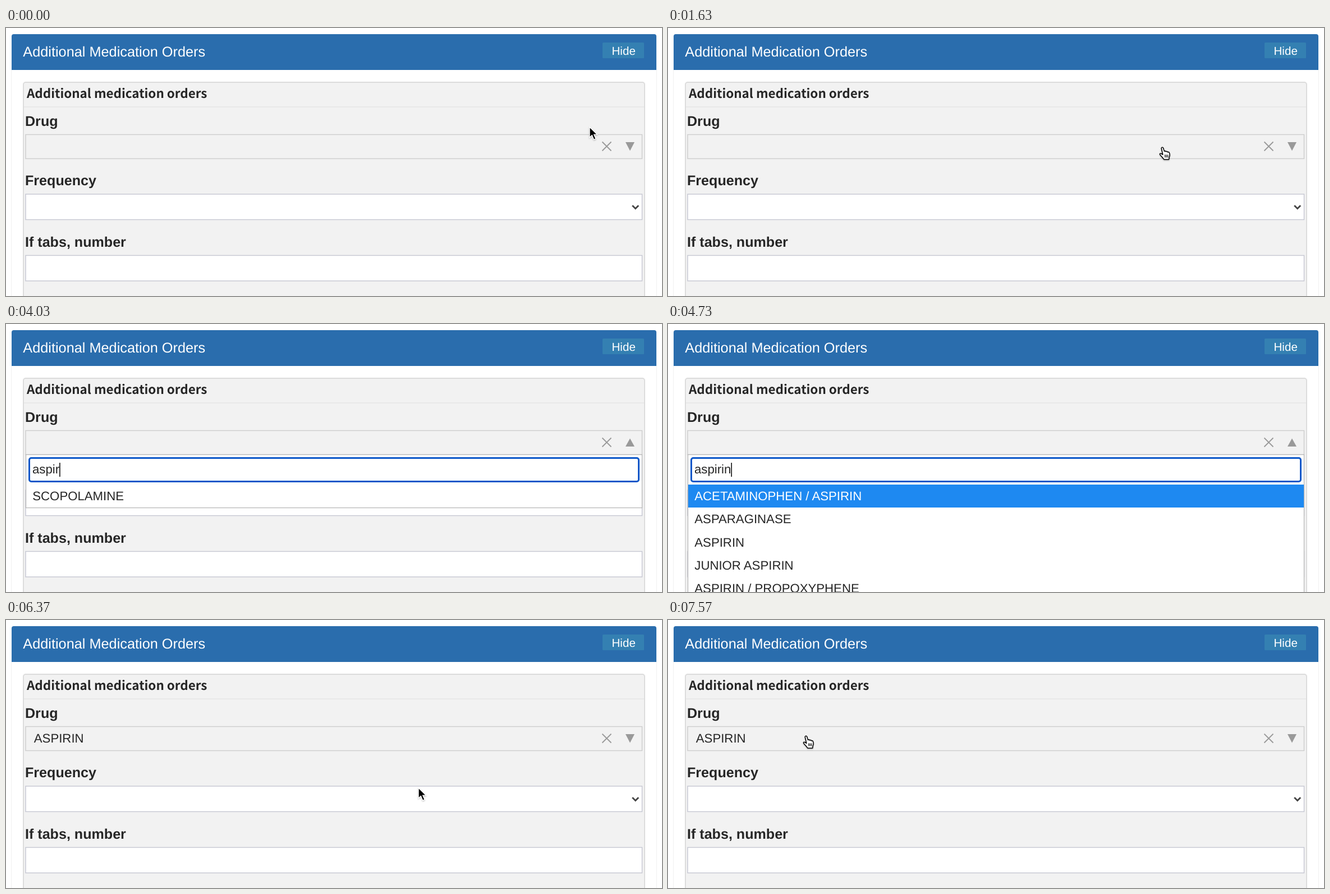
An HTML page for the animation above (8000 ms loop, 1169 by 479 pixels).

```html
<!DOCTYPE html>
<html lang="en">
<head>
<meta charset="utf-8">
<title>Medication order form</title>
<style>
  html, body { margin: 0; width: 100%; height: 100%; overflow: hidden; background: #fff; }
  svg { display: block; width: 1169px; height: 479px; }
  text { font: 22.2px "Liberation Sans", Arial, sans-serif; fill: #262626; text-rendering: geometricPrecision; white-space: pre; }
  .title { font-size: 25.3px; fill: #fff; }
  .hide { font-size: 20.6px; fill: #fff; }
  .legend { font: bold 22.4px "Noto Sans CJK JP", "Noto Sans CJK SC", "Noto Sans CJK", "Noto Sans", sans-serif; }
  .label { font-size: 25.1px; font-weight: bold; }
  .field { fill: #fff; stroke: #c5c7d2; stroke-width: 1.4; }
  .picked { fill: #fff; }
</style>
</head>
<body>
<svg viewBox="0 0 1169 479">
  <defs>
    <filter id="soft" x="-50%" y="-50%" width="200%" height="200%">
      <feDropShadow dx="0" dy="1.2" stdDeviation="1" flood-opacity=".3"/>
    </filter>
  </defs>

  <path d="M9.5 75V490M1159.5 75V490" stroke="#f0f0f0"/>
  <path d="M10 75V15Q10 11 14 11H1155Q1159 11 1159 15V75Z" fill="#2a6dad"/>
  <text class="title" x="30.3" y="51.3">Additional Medication Orders</text>
  <rect x="1063" y="26" width="74" height="28" rx="1.5" fill="#3480b2"/>
  <text class="hide" x="1079.5" y="47.8">Hide</text>

  <rect x="31" y="97" width="1107" height="400" rx="4" fill="#f2f2f2" stroke="#dcdcdc" stroke-width="2"/>
  <path d="M32 141H1137" stroke="#e6e6e6" stroke-width="1.5"/>
  <text class="legend" x="37" y="125">Additional medication orders</text>

  <text class="label" x="34" y="174.8">Drug</text>
  <rect x="35" y="190.5" width="1098.5" height="43" fill="#f2f2f2" stroke="#cdcdcd" stroke-width="1.4"/>
  <text id="value" x="49.8" y="219">ASPIRIN</text>
  <path d="M1062.5 203.5L1078.5 219.5M1078.5 203.5L1062.5 219.5" stroke="#999" stroke-width="1.8"/>
  <path id="toggle" fill="#999"/>

  <text class="label" x="34" y="281.3">Frequency</text>
  <rect class="field" x="35" y="297" width="1098.5" height="45.5"/>
  <path d="M1116.2 317.3L1121.7 322.8L1127.2 317.3" fill="none" stroke="#444" stroke-width="2.8"/>
  <text class="label" x="34" y="390.6">If tabs, number</text>
  <rect class="field" x="35" y="406.5" width="1098.5" height="45.5"/>

  <g id="drop">
    <rect id="sheet" x="35.5" y="233.5" width="1098" fill="#fff" stroke="#b8b8b8" stroke-width="1.3"/>
    <rect x="41.5" y="239.5" width="1086" height="42" rx="3.5" fill="#fff" stroke="#0b57c8" stroke-width="3"/>
    <text id="query" x="47" y="267.3"></text>
    <rect id="caret" y="248" width="1.6" height="25" fill="#111"/>
    <rect id="mark" x="36" y="287" width="1097" height="41" fill="#1e89f1"/>
    <g id="rows"></g>
  </g>

  <g id="pointer">
    <g id="arrow" filter="url(#soft)">
      <path d="M0 0V18.6L4.3 14.6L7.6 22.4L11 21L7.7 13.4H13.4Z" fill="#000" stroke="#fff" stroke-width="1.3"/>
    </g>
    <g id="hand" filter="url(#soft)" transform="translate(-6 0)">
      <path d="M4.2 2.8C4.5 .7 6.9 .6 7.6 2.5L9.4 8.4C10.3 7.4 12 7.7 12.3 9C13.4 8.1 15 8.5 15.2 9.9C16.5 9.1 18.2 9.8 18.6 11.6C19.4 14.4 19.4 16.4 18.2 18.8L17.6 23H8.8C7.6 20.8 5.2 18.4 2.6 15.6C.4 13.2 1.6 11.3 3.8 12.5L6.8 14.4Z"
        fill="#fff" stroke="#000" stroke-width="1.5" stroke-linejoin="round"/>
      <path d="M10.6 14.4L11 19.4M13.1 14.4L13.4 19.4M15.6 14.4L15.8 19.4" stroke="#000" stroke-width="1.2"/>
    </g>
    <g id="beam" fill="none" stroke-linecap="round">
      <path id="beamLine" d="M-4-10.5Q0-10.5 0-7.5Q0-10.5 4-10.5M0-8V8M-4 10.5Q0 10.5 0 7.5Q0 10.5 4 10.5M-2.5 4H2.5" stroke="#fff" stroke-width="3.4"/>
      <use href="#beamLine"/>
      <path d="M-4-10.5Q0-10.5 0-7.5Q0-10.5 4-10.5M0-8V8M-4 10.5Q0 10.5 0 7.5Q0 10.5 4 10.5M-2.5 4H2.5" stroke="#000" stroke-width="1.7"/>
    </g>
  </g>
</svg>
<script>
const LOOP = 8000, OPEN = 1800, CLOSE = 6370;
const $ = id => document.getElementById(id);
const show = (id, on) => $(id).setAttribute("display", on ? "inline" : "none");

// time, x, y of the pointer's hot spot
const path = [
  [0, 1040, 177], [800, 882, 211], [970, 882, 211], [1070, 881, 212],
  [4960, 881, 212], [5730, 756, 280], [6270, 735, 300], [6570, 735, 300],
  [6670, 541, 284], [6730, 451, 269], [6970, 451, 269], [7570, 246, 206], [LOOP, 246, 206]
];
const fade = [
  [0, 1], [2230, 1], [2430, 0], [2570, 0], [2770, 1], [3270, 1], [3340, 0],
  [3590, 0], [3600, 1], [LOOP, 1]
];
const keys = [3600, 3700, 3830, 3930, 4030, 4130, 4300];

const pain = "ACETAMINOPHEN / ASPIRIN", junior = "JUNIOR ASPIRIN", mix = "ASPIRIN / PROPOXYPHENE";
const lists = [
  { from: OPEN, items: ["SCOPOLAMINE"], picked: true },
  { from: 3870, items: ["SCOPOLAMINE"], picked: false },
  { from: 4600, items: [pain, "ASPARAGINASE", "ASPIRIN", junior, mix], picked: true },
  { from: 4930, items: ["ASPIRIN", pain, junior, mix], picked: true }
];

const smooth = p => p * p * (3 - 2 * p);
const linear = p => p;

function sample(table, t, ease) {
  const i = Math.max(1, table.findIndex(k => k[0] > t));
  const a = table[i - 1], b = table[i];
  const p = ease((t - a[0]) / (b[0] - a[0]));
  return a.slice(1).map((v, n) => v + (b[n + 1] - v) * p);
}

let shown = null;
function setList(list) {
  if (list === shown) return;
  shown = list;
  $("sheet").setAttribute("height", 53.5 + 41.5 * list.items.length);
  show("mark", list.picked);
  $("rows").replaceChildren(...list.items.map((name, i) => {
    const row = document.createElementNS("http://www.w3.org/2000/svg", "text");
    row.setAttribute("x", 47.3);
    row.setAttribute("y", 314.8 + 41.4 * i);
    if (!i && list.picked) row.setAttribute("class", "picked");
    row.textContent = name;
    return row;
  }));
}

function drawDrop(t) {
  const open = t >= OPEN && t < CLOSE;
  show("drop", open);
  show("value", t >= CLOSE);
  $("toggle").setAttribute("d", open ? "M1104 219H1120L1112 204.5Z" : "M1104 204H1120L1112 219.5Z");
  if (!open) return;
  setList(lists.filter(l => l.from <= t).pop());
  const typed = "aspirin".slice(0, keys.filter(k => k <= t).length);
  $("query").textContent = typed;
  $("caret").setAttribute("x", 47 + (typed ? $("query").getComputedTextLength() : 0));
  $("caret").setAttribute("opacity", sample(fade, t, linear)[0]);
}

function drawPointer(t) {
  const open = t >= OPEN && t < CLOSE;
  const [x, y] = sample(path, t, t > 6600 && t < 6740 ? linear : smooth);
  const kind = y >= 190 && y < 234 ? "hand" : open && y >= 234 && y < 286 ? "beam" : "arrow";
  for (const id of ["arrow", "hand", "beam"]) show(id, id === kind);
  $("pointer").setAttribute("transform", `translate(${x} ${y})`);
  show("pointer", t < keys[0] || t >= 4960); // hidden while typing
}

const start = performance.now();
function frame() {
  const t = (performance.now() - start) % LOOP;
  drawDrop(t);
  drawPointer(t);
  requestAnimationFrame(frame);
}
frame();
</script>
</body>
</html>
```
